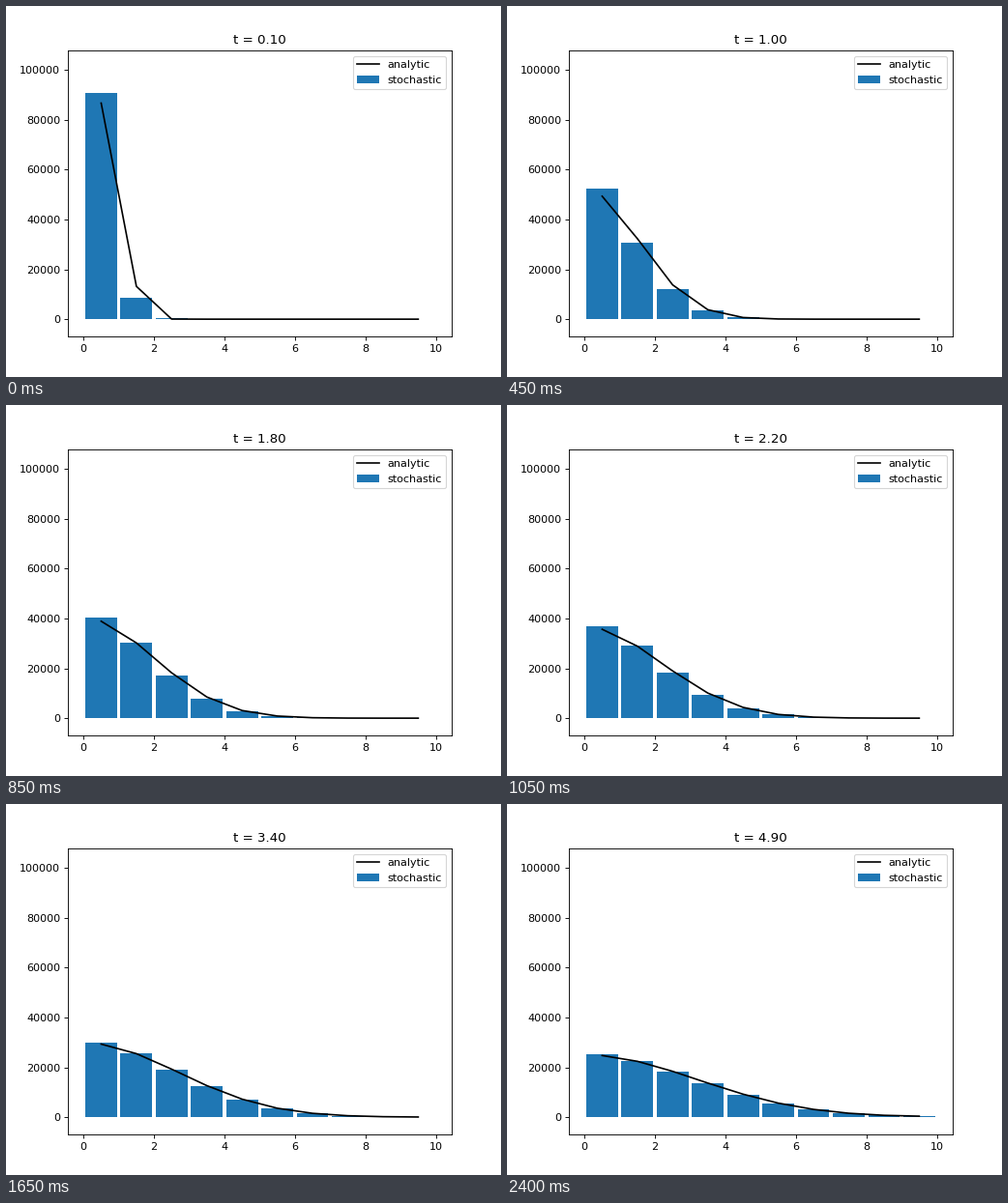
Animation, 512 px wide and 384 px high, one loop 2.45 s. Source, as a matplotlib script:

```python
import numpy as np
import matplotlib.pyplot as plt
from matplotlib.animation import FuncAnimation

CELLS = 10
PARTICLES = 100000
STEPS = 49
DT = 0.1
MODES = 100

centers = np.arange(CELLS) + 0.5


def analytic(t):
    """Cosine series for diffusion of a unit block between reflecting walls."""
    k = np.arange(1, MODES + 1) * np.pi / CELLS
    weights = 2 * np.sin(k) / (CELLS * k) * np.exp(-k**2 * t)
    return PARTICLES * (1 / CELLS + np.cos(np.outer(centers, k)) @ weights)


def stochastic(t):
    """Mean cell counts for hopping at unit rate, starting in the first cell."""
    k = np.arange(1, CELLS) * np.pi / CELLS
    weights = 2 / CELLS * np.cos(k / 2) * np.exp(-2 * (1 - np.cos(k)) * t)
    return PARTICLES * (1 / CELLS + np.cos(np.outer(centers, k)) @ weights)


fig, ax = plt.subplots(figsize=(6.4, 4.8), dpi=80)

# The axis limits are set by the initial state and then kept.
bars = ax.bar(centers, stochastic(0), width=0.9, color="#1f77b4",
              label="stochastic")
line, = ax.plot(centers, analytic(0), color="black", label="analytic")
ax.set_xlim(ax.get_xlim())
ax.set_ylim(ax.get_ylim())
ax.legend(handles=[line, bars], loc="upper right")
title = ax.set_title("")


def update(i):
    t = (i + 1) * DT
    for bar, count in zip(bars, np.round(stochastic(t))):
        bar.set_height(count)
    line.set_ydata(analytic(t))
    title.set_text(f"t = {t:.2f}")
    return [*bars, line, title]


anim = FuncAnimation(fig, update, frames=STEPS, interval=50, repeat=True,
                     repeat_delay=0, blit=False)
plt.show()
```
